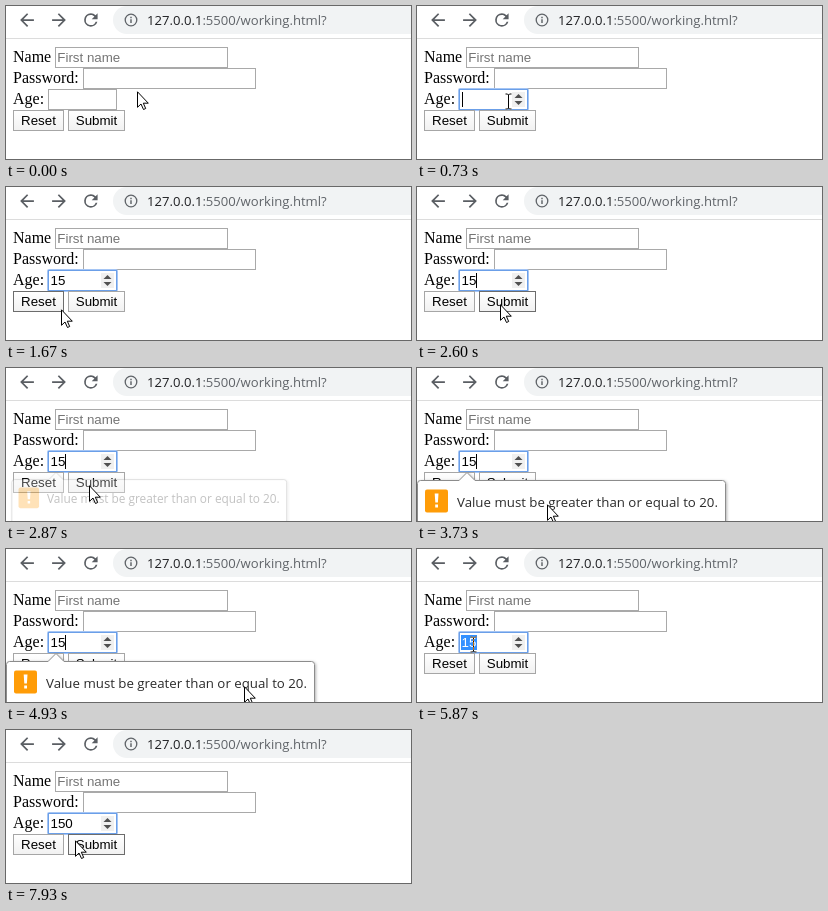
An HTML page for the animation above (8 s loop, 405 by 153 pixels).

```html
<!DOCTYPE html>
<html lang="en">
<head>
<meta charset="utf-8">
<title>Form validation</title>
<style>
  html, body { margin: 0; height: 100%; overflow: hidden; background: #fff; }
  svg { display: block; }
  #stage { width: 100vw; height: 100vh; }
  text { white-space: pre; }
  .ui { font: 13.1px "Open Sans", "Noto Sans", sans-serif; }
  .message { font-size: 13.27px; }
  .label { font: 16px "Liberation Serif", serif; }
  .control { font: 13.33px "Liberation Sans", sans-serif; }
  .field { fill: #fff; stroke: #a9a9a9; }
  .field.focus { stroke: #6b9fe8; }
  .button { fill: url(#face); stroke: #a6a6a6; }
  .button.hover { stroke: #6c6c6c; }
  #ibeam { mix-blend-mode: difference; }
</style>
</head>
<body>
<svg id="stage" viewBox="0 0 405 153">
  <defs>
    <linearGradient id="face" x2="0" y2="1">
      <stop stop-color="#fff"/><stop offset="1" stop-color="#f1f1f1"/>
    </linearGradient>
    <filter id="shadow" x="-5%" y="-20%" width="110%" height="140%">
      <feDropShadow dx="1" dy="1" stdDeviation="1.5" flood-opacity=".3"/>
    </filter>
    <path id="back" d="M20 11H7.83l5.59-5.59L12 4l-8 8 8 8 1.41-1.41L7.83 13H20z"/>
  </defs>
  <rect width="405" height="153" fill="#fff"/>

  <!-- browser toolbar -->
  <path d="M0 32.5H405" stroke="#dcdcdc"/>
  <rect x="107" width="320" height="28" rx="14" fill="#f1f3f4"/>
  <g fill="#5a5e63">
    <use href="#back" transform="translate(10.700 3.700) scale(.86)"/>
    <use href="#back" transform="translate(63.300 3.700) scale(-.86 .86)"/>
    <path transform="translate(74.800 3.900) scale(.84)" d="M17.65 6.35A8 8 0 0 0 12 4a8 8 0 1 0 7.73 10h-2.08A6 6 0 1 1 12 6c1.66 0 3.14.69 4.22 1.78L13 11h7V4z"/>
    <circle cx="125" cy="14" r="5.8" fill="none" stroke="#5f6368" stroke-width="1.3"/>
    <path d="M124.3 13.2h1.4v3.8h-1.4zM124.3 10.8h1.4v1.4h-1.4z"/>
  </g>
  <text class="ui" x="141" y="18.5" fill="#202124">127.0.0.1<tspan fill="#5f6368">:5500/working.html?</tspan></text>

  <!-- form -->
  <g class="label">
    <text x="7" y="56">Name</text>
    <text x="7" y="77">Password:</text>
    <text x="7" y="98">Age:</text>
  </g>
  <rect class="field" x="49.5" y="41.5" width="172" height="20"/>
  <rect class="field" x="77.5" y="62.5" width="172" height="20"/>
  <rect class="field" id="age" x="42.5" y="83.5" width="68" height="20"/>
  <rect id="ring" x="41.5" y="82.5" width="70" height="22" rx="1" fill="none" stroke="#a5c5f4"/>
  <rect class="button" id="reset" x="7.5" y="104.5" width="50" height="20"/>
  <rect class="button" id="submit" x="62.5" y="104.5" width="56" height="20"/>
  <g class="control">
    <text x="51.3" y="56" fill="#757575">First name</text>
    <text x="32.5" y="119" text-anchor="middle">Reset</text>
    <text x="90.5" y="119" text-anchor="middle">Submit</text>
    <rect id="selection" x="44" y="86" width="16" height="15" fill="#3390ff"/>
    <text id="value" x="44.5" y="98"></text>
  </g>
  <rect id="caret" y="86" width="1" height="15"/>
  <g id="spinner">
    <rect x="95" y="86" width="13" height="15" fill="#f0f0f0"/>
    <path d="M97.5 92l4-4 4 4zM97.5 95l4 4 4-4z" fill="#505050"/>
  </g>

  <!-- validation message, clipped to its popup window -->
  <svg y="103" width="405" height="50" viewBox="0 103 405 50">
    <g id="bubble">
      <path d="M.5 170V115.5q0-3 3-3H42l8-8 8 8H305.5q3 0 3 3V170z" fill="#fff" stroke="#8c8c8c" filter="url(#shadow)"/>
      <rect x="8" y="121.5" width="23" height="23" rx="2" fill="#ff9c07"/>
      <path d="M17.7 125.5h3.800l-.6 9h-2.600zM18.200 136.600h2.800v2.800h-2.800z" fill="#fff"/>
      <text class="ui message" x="40" y="138.5" fill="#2b2b2b">Value must be greater than or equal to 20.</text>
    </g>
  </svg>

  <path id="ibeam" d="M-3 -7.5H-1L0 -6.5 1 -7.5H3M-3 7.5H-1L0 6.5 1 7.5H3M0 -6.5V6.5" fill="none" stroke="#fff"/>
  <path id="arrow" d="M.5 .8V16.300L4 13l2.500 5.500 2.200-1L6.300 12.200H11.300z" fill="#fff" stroke="#000"/>
</svg>
<script>
const LOOP = 8000;
const el = id => document.getElementById(id);
const [age, ring, reset, submit, selection, value, caret, spinner, bubble, ibeam, arrow] =
  ['age', 'ring', 'reset', 'submit', 'selection', 'value', 'caret', 'spinner', 'bubble', 'ibeam', 'arrow'].map(el);

// pointer stops: time, x, y
const POINTER = [
  [0, 131, 85], [70, 131, 85], [530, 92, 95], [670, 92, 95], [930, 87, 95],
  [1470, 86, 95], [1670, 55, 122], [1900, 49, 119], [2330, 84, 116], [2600, 83, 117],
  [2900, 83, 117], [3200, 77, 122], [3470, 38, 134], [4070, 267, 139], [4270, 238, 137],
  [4930, 238, 137], [5500, 56, 95], [7600, 56, 95], [7730, 50, 96], [7800, 50, 96], [7930, 69, 110]
];
const TYPED = [[0, ''], [800, '1'], [1130, '15'], [6870, '1'], [7000, '15'], [7130, '150']];
const CARET_RESETS = [500, 800, 1130, 2700, 5530, 6870, 7000, 7130];
const FOCUS = 500, SHOW = 2800, HIDE = 5530, SELECT = 5870, RETYPE = 6870;

const clamp = v => Math.min(1, Math.max(0, v));
const smooth = v => v * v * (3 - 2 * v);
const easeOut = v => 1 - (1 - v) ** 2;
const show = (node, on) => node.setAttribute('visibility', on ? 'visible' : 'hidden');

function pointerAt(t) {
  const next = POINTER.findIndex(p => p[0] > t);
  if (next < 0) return POINTER.at(-1).slice(1);
  const [t0, x0, y0] = POINTER[next - 1], [t1, x1, y1] = POINTER[next];
  const k = smooth((t - t0) / (t1 - t0));
  return [x0 + (x1 - x0) * k, y0 + (y1 - y0) * k];
}

function render(t) {
  const [x, y] = pointerAt(t);
  const inside = (l, top, r, b) => x >= l && x < r && y >= top && y < b;
  const open = t >= SHOW && t < HIDE + 180;
  const focused = t >= FOCUS;
  const selected = t >= SELECT && t < RETYPE;

  age.classList.toggle('focus', focused);
  show(ring, focused);
  show(spinner, focused || inside(42, 83, 111, 104));
  reset.classList.toggle('hover', !open && inside(7, 104, 58, 125));
  submit.classList.toggle('hover', !open && inside(62, 104, 119, 125));

  const text = TYPED.findLast(step => step[0] <= t)[1];
  value.textContent = text;
  value.setAttribute('fill', selected ? '#fff' : '#000');
  show(selection, selected);

  const blink = t - (CARET_RESETS.findLast(r => r <= t) ?? 0);
  show(caret, focused && !selected && blink % 1000 < 500);
  caret.setAttribute('x', 45 + Math.round(text.length * 7.2));

  // the bubble grows out of the tip of its arrow
  const grow = easeOut(clamp((t - SHOW) / 467));
  bubble.setAttribute('opacity', grow * (1 - clamp((t - HIDE) / 180)));
  bubble.setAttribute('transform', `translate(50 104) scale(${0.85 + 0.15 * grow}) translate(-50 -104)`);

  const overText = inside(42, 83, 94, 104);
  show(ibeam, overText);
  show(arrow, !overText);
  const place = `translate(${Math.round(x)} ${Math.round(y)})`;
  arrow.setAttribute('transform', place);
  ibeam.setAttribute('transform', place + ' translate(.5 .5)');
}

const start = performance.now();
function tick() {
  render((performance.now() - start) % LOOP);
  requestAnimationFrame(tick);
}
tick();
</script>
</body>
</html>
```
